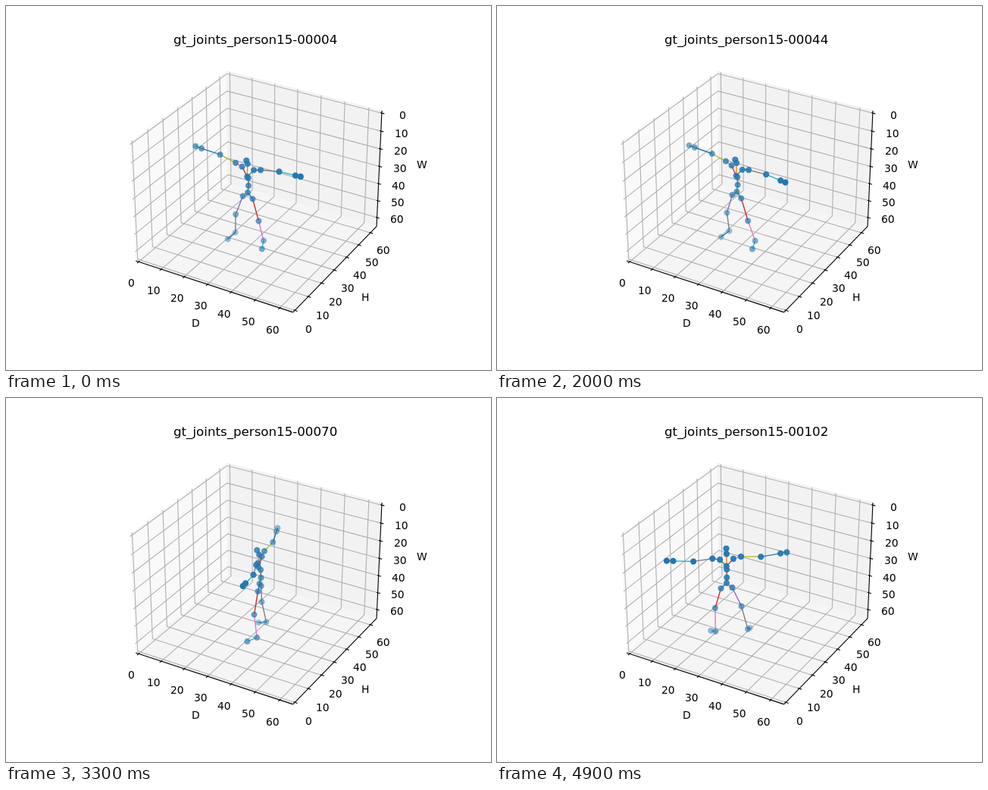
An HTML page that plays this animation: 640x480 px, repeating every 5000 ms.

```html
<!DOCTYPE html>
<html lang="en">
<head>
<meta charset="utf-8">
<title>Joints</title>
<style>
  html, body { margin: 0; width: 100%; height: 100%; overflow: hidden; background: #fff; }
  svg { display: block; font: 13.89px "DejaVu Sans", sans-serif; }
  #title { font-size: 16.67px; }
  path { fill: none; }
  .grid { stroke: #b0b0b0; stroke-width: 1.11; }
  .axis { stroke: #000; stroke-width: 1.11; }
  .bone { stroke-width: 1.39; stroke-linecap: square; }
  circle { fill: #1f77b4; stroke: #1f77b4; stroke-width: 2.08; }
</style>
</head>
<body>
<svg width="640" height="480" viewBox="0 0 640 480">
  <g id="box"></g>
  <text id="title" x="221" y="50"></text>
  <g id="body"></g>
</svg>
<script>
const $ = id => document.getElementById(id);

// ---- Axes box: perspective view, azimuth -60, elevation 30 ----
const SIZE = 64, LO = -SIZE / 48, HI = SIZE - LO, STEP = SIZE / 12;

function project([d, h, w]) {
  const x = (d / SIZE - .5) * 1.143, y = (h / SIZE - .5) * 1.143, z = (.5 - w / SIZE) * .8572;
  const k = 1997.8 / (10 - (.433 * x - .75 * y + .5 * z));
  return [333 + k * (.866 * x + .5 * y), 237.4 - k * (-.25 * x + .433 * y + .866 * z)];
}
const route = pts => 'M' + pts.map(p => project(p).map(v => v.toFixed(2))).join('L');
const line = (cls, ...pts) => `<path class="${cls}" d="${route(pts)}"/>`;
const pane = (grey, ...pts) => `<path d="${route(pts)}Z" style="fill:${grey};stroke:${grey}"/>`;
const label = (text, p, drop) => {
  const [x, y] = project(p);
  return `<text x="${x}" y="${Math.round(y + drop)}">${text}</text>`;
};

// at(t, o): point beside the axis, moved outwards by o; tick moves along one direction only
const axes = [
  { name: 'D', at: (t, o = 0) => [t, LO - o, HI + o], tick: (t, o) => [t, LO - o, HI],
    grid: t => [[t, LO, HI], [t, HI, HI], [t, HI, LO]] },
  { name: 'H', at: (t, o = 0) => [HI + o, t, HI + o], tick: (t, o) => [HI + o, t, HI],
    grid: t => [[LO, t, LO], [LO, t, HI], [HI, t, HI]] },
  { name: 'W', at: (t, o = 0) => [HI + o, HI + o, t], tick: (t, o) => [HI + o, HI, t],
    grid: t => [[LO, LO, t], [LO, HI, t], [HI, HI, t]] }
];

const panes = pane('#f9f9f9', [LO, LO, LO], [LO, HI, LO], [LO, HI, HI], [LO, LO, HI])
  + pane('#f2f2f2', [LO, HI, LO], [HI, HI, LO], [HI, HI, HI], [LO, HI, HI])
  + pane('#f5f5f5', [LO, LO, HI], [HI, LO, HI], [HI, HI, HI], [LO, HI, HI]);
let grids = '', marks = '';
for (const a of axes) {
  marks += line('axis', a.at(LO), a.at(HI)) + label(a.name, a.at(SIZE / 2, 2.255 * STEP), 5);
  for (let t = 0; t <= 60; t += 10) {
    grids += line('grid', ...a.grid(t));
    marks += line('axis', a.tick(t, -.1 * STEP), a.tick(t, .2 * STEP))
      + label(t, a.at(t, 1.037 * STEP), 11);
  }
}
$('box').innerHTML = panes + grids + marks;

// Centre the labels by their ink, on whole pixels
for (const text of $('box').querySelectorAll('text')) {
  const ink = text.getComputedTextLength() - 1.6;
  text.setAttribute('x', Math.round(text.getAttribute('x') - ink / 2));
}

// ---- Skeleton: name, parent, offset outwards, forwards, upwards, share of lean and of lift ----
// A joint with an outward offset exists on both sides.
const joints = [
  ['hip', 'pelvis', 7.5, 0, -7.5],
  ['waist', 'pelvis', 0, -2, 9.5],
  ['knee', 'hip', 10, 1.5, -30, .4],
  ['spine', 'waist', 0, .5, 12],
  ['ankle', 'knee', 4, -6, -31.8, .6],
  ['chest', 'spine', 0, 3, 3.5],
  ['foot', 'ankle', 4.5, 12, -5.4],
  ['neck', 'chest', 0, -1, 19],
  ['collar', 'chest', 9, -2, 11.5],
  ['head', 'neck', 0, 3, 6.5],
  ['shoulder', 'collar', 10, -.5, 2.8],
  ['elbow', 'shoulder', 26, -4, 0, 0, 1],
  ['wrist', 'elbow', 26.5, 3, 1.2, 0, .7],
  ['hand', 'wrist', 8.5, 1, .4, 0, .3]
];
const cycle = ['#1f77b4', '#ff7f0e', '#2ca02c', '#d62728', '#9467bd',
  '#8c564b', '#e377c2', '#7f7f7f', '#bcbd22', '#17becf'];

// The whole body turns and sways; pull tells how fast each key is passed
const keys = {
  time: [0, .8, 1.6, 2.4, 2.9, 3.7, 4.9],
  pull: [1, 1, .4, 1, 1, .5, 1.5],
  yaw:  [30, 30, 28, 55, 84, 123, 172],
  x:    [319, 318.3, 315, 321, 334, 331.5, 303],
  y:    [246, 246, 244, 246, 246, 244, 244],
  lean: [0, 0, 10, -2, 0, -3, 6],
  lift: [3, 3, 1, 0, 0, 0, 0]
};

// Cubic Hermite curve through the keys
function curve(v, t) {
  const { time, pull } = keys, n = time.length - 1;
  const slope = i => (v[i + 1] - v[i]) / (time[i + 1] - time[i]);
  const tangent = i => pull[i] * (slope(Math.max(i - 1, 0)) + slope(Math.min(i, n - 1))) / 2;
  let i = 0;
  while (i < n - 1 && t >= time[i + 1]) i++;
  const span = time[i + 1] - time[i], u = (t - time[i]) / span, s = u * u * (3 - 2 * u);
  return v[i] * (1 - s) + v[i + 1] * s
    + span * u * (1 - u) * ((1 - u) * tangent(i) - u * tangent(i + 1));
}

// Returns the joints in bone order; each knows its parent and its nearness to the viewer
function poseAt(t) {
  const now = name => curve(keys[name], t);
  const yaw = now('yaw') * Math.PI / 180, cos = Math.cos(yaw), sin = Math.sin(yaw);
  const lean = now('lean'), lift = now('lift');
  const pose = { pelvis: { x: now('x'), y: now('y'), near: 0 } };
  for (const [name, parent, out, forward, up, leans = 0, lifts = 0] of joints) {
    for (const side of out ? ['L', 'R'] : ['']) {
      const from = pose[parent + side] || pose[parent];
      const o = side === 'R' ? -out : out, rise = up + lift * lifts;
      const toward = o * sin + forward * cos;
      pose[name + side] = {
        from,
        x: from.x + o * cos - forward * sin + lean * leans,
        y: from.y + .5 * toward - .866 * rise,
        near: from.near + .866 * toward + .5 * rise
      };
    }
  }
  return Object.values(pose);
}

function draw(step) {
  $('title').textContent = 'gt_joints_person15-' + String(4 + 2 * step).padStart(5, '0');
  const pose = poseAt(step / 10);
  const bones = pose.slice(1).map((p, i) =>
    `<path class="bone" stroke="${cycle[i % 10]}" d="M${p.from.x},${p.from.y}L${p.x},${p.y}"/>`);
  pose.sort((a, b) => a.near - b.near);
  const far = pose[0].near, range = pose[pose.length - 1].near - far;
  const dots = pose.map(p => {
    const alpha = .3 + .7 * (p.near - far) / range;
    return `<circle cx="${p.x}" cy="${p.y}" r="3.1" fill-opacity="${alpha}" stroke-opacity="${alpha}"/>`;
  });
  $('body').innerHTML = bones.concat(dots).join('');
}

let shown = -1;
const start = performance.now();
function tick() {
  const step = Math.floor((performance.now() - start) % 5000 / 100);
  if (step !== shown) draw(shown = step);
  requestAnimationFrame(tick);
}
tick();
</script>
</body>
</html>
```
